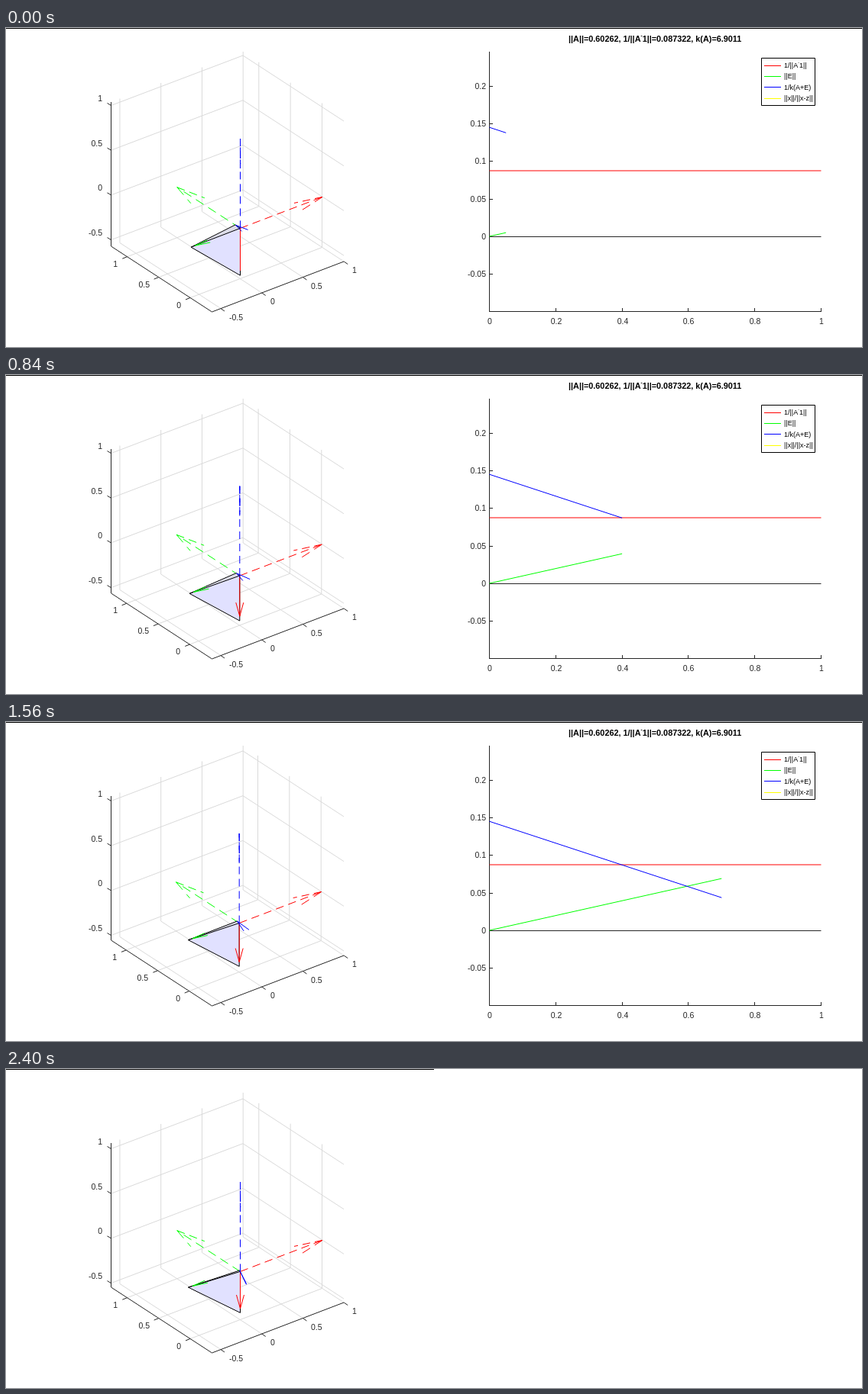
Write an HTML page with a canvas that moves like this. It is 1120x418 px and loops after 2520 ms.

```html
<!DOCTYPE html>
<html lang="en">
<head>
<meta charset="utf-8">
<style>
html, body { margin: 0; width: 100%; height: 100%; overflow: hidden; background: #fff; }
canvas { display: block; }
</style>
</head>
<body>
<canvas id="stage" width="1120" height="418"></canvas>
<script>
const ctx = document.getElementById('stage').getContext('2d');
const STEP = 120, STEPS = 21;
const RED = '#f00', GREEN = '#0f0', BLUE = '#00f', YELLOW = '#ff0';
const INK = '#262626', GRID = '#dadada';
const FAMILY = '"Liberation Sans", Arial, sans-serif';

const add = (a, b, s = 1) => [a[0] + b[0] * s, a[1] + b[1] * s];
const mix = (a, b, p) => [a[0] + (b[0] - a[0]) * p, a[1] + (b[1] - a[1]) * p];

function line(points, color, width = 1, dash = []) {
  ctx.beginPath();
  points.forEach(p => ctx.lineTo(p[0], p[1]));
  ctx.strokeStyle = color;
  ctx.lineWidth = width;
  ctx.setLineDash(dash);
  ctx.stroke();
}

function fill(points, color) {
  ctx.beginPath();
  points.forEach(p => ctx.lineTo(p[0], p[1]));
  ctx.fillStyle = color;
  ctx.fill();
}

// Dashes are spaced evenly along the longer screen axis
function dashed(from, v, color) {
  const unit = Math.hypot(...v) / Math.max(Math.abs(v[0]), Math.abs(v[1]));
  line([from, add(from, v)], color, 1, [10 * unit, 6 * unit]);
}

function text(str, x, y, align = 'left', font = '10.5px', color = INK) {
  ctx.font = font + ' ' + FAMILY;
  ctx.textAlign = align;
  ctx.fillStyle = color;
  ctx.fillText(str, Math.round(x), Math.round(y));
}

// Text with a raised minus sign after the first part
function raised(before, after, x, y, size, weight = '') {
  const font = `${weight} ${size}px ${FAMILY}`;
  const small = `${weight} ${size * 0.6}px ${FAMILY}`;
  ctx.textAlign = 'left';
  ctx.fillStyle = '#000';
  const put = (str, f, dy) => {
    ctx.font = f;
    ctx.fillText(str, x, y + dy);
    x += ctx.measureText(str).width;
  };
  put(before, font, 0);
  put('-', small, -size * 0.55);
  put(after, font, 0);
}

// Screen vectors of one unit along each axis of the box
const X = [107.5, -41], Y = [-82.7, -53.7], Z = [0, -117.4];
const LEFT = [137.5, 286], FRONT = [269.5, 372], RIGHT = [442, 306], BACK = [310, 220];
const RISE = [0, -189];

function drawBox(drift, lift) {
  const alongX = add(RIGHT, FRONT, -1), alongY = add(LEFT, FRONT, -1);

  for (const v of [-0.5, 0, 0.5, 1]) {
    const p = add([334.7, 347], X, v), q = add(p, alongY);
    line([p, q, add(q, RISE)], GRID);
    line([p, add(p, [5, 3.5])], INK);
    text(v, p[0] + 11, p[1] + 15);

    const back = [BACK[0], BACK[1] - lift + Z[1] * v];
    const side = [LEFT[0], back[1] + 65.5];
    line([side, back, [RIGHT[0], back[1] + 86]], GRID);
    line([side, add(side, [-5, -3])], INK);
    text(v, 126, side[1] - 5.5, 'right');
  }
  for (const v of [0, 0.5, 1]) {
    const p = add(add([241, 353.5], drift), Y, v), q = add(p, alongX);
    line([p, q, add(q, RISE)], GRID);
    line([p, add(p, [-6, 2.4])], INK);
    text(v, p[0] - 12, p[1] + 13, 'right');
  }
  line([add(LEFT, RISE), LEFT, FRONT, RIGHT], INK);
}

function unitArrow(o, axis, color, wings) {
  dashed(o, axis, color);
  wings.forEach(w => dashed(add(o, axis), w, color));
}

function drawSpace(k) {
  const p = k / 20;
  const d = k < 15 ? -0.1 * k : 0;
  const drift = [d, d * 0.65];
  const lift = 66.6 - 3 * p;
  drawBox(drift, lift);

  const o = add([306.5, 329 - lift], drift);
  const rv = mix([0, 61.8], [0, 54], p);
  const gv = mix([-64.4, 24.8], [-68, 20.7], p);
  const bv = mix([-6.5, -4.5], [-0.8, -1.5], p);
  const r = add(o, rv), g = add(o, gv), b = add(o, bv);

  unitArrow(o, X, RED, [[-37, 8], [-28, 18]]);
  unitArrow(o, Y, GREEN, [[36, 14], [18, 21]]);
  unitArrow(o, Z, BLUE, [[0, 39], [0.3, 33]]);

  fill([o, b, g], '#dcdce8');
  fill([o, g, r], '#e1e1ff');
  line([o, b, g, r, o, g], '#000');

  const redTip = add(o, rv, 0.9);
  line([o, redTip], RED);
  if (k > 0) line([add(redTip, [-5, -18]), redTip, add(redTip, [5, -18])], RED);

  const greenTip = add(o, gv, 0.92);
  line([add(greenTip, [20, -4.3]), greenTip, add(greenTip, [16, -7.2])], GREEN);

  const blueTip = add(o, bv, 0.9);
  const wing1 = add(o, [10 + 16 * p - 18 * p * p, 2 + 4 * p + 10 * p * p]);
  const wing2 = add(o, [2 + 6 * p, 4 + 4 * p + 9 * p * p]);
  line([wing1, blueTip, wing2], BLUE);
}

const px = t => 632.5 + 434 * t;
const py = v => 273 - 985.5 * v;
const snap = v => Math.round(v) + 0.5;
const ratio = t => (1 - t) * (0.9 + 1.6 * (1 - t));

function drawLegend() {
  ctx.fillStyle = '#fff';
  ctx.fillRect(988, 40, 70, 61);
  line([[988.5, 39.5], [1058.5, 39.5], [1058.5, 101.5], [988.5, 101.5], [988.5, 39.5]], '#000');
  [RED, GREEN, BLUE, YELLOW].forEach((c, i) => {
    const y = Math.floor(49 + 14.4 * i) + 0.5;
    line([[992, y], [1014, y]], c);
  });
  raised('1/||A', '1||', 1018, 52, 9);
  text('||E||', 1018, 66, 'left', '9px', '#000');
  text('1/k(A+E)', 1018, 81, 'left', '9px', '#000');
  text('||x||/||x-z||', 1018, 95, 'left', '9px', '#000');
}

function drawPlot(t) {
  line([[632.5, 31], [632.5, 371.5], [1066.5, 371.5]], INK);
  for (let i = 0; i <= 5; i++) {
    const x = snap(px(i / 5) - 0.5);
    line([[x, 372], [x, 367]], INK);
    text(i / 5, x, 388, 'center');
  }
  for (let i = -1; i <= 4; i++) {
    const y = snap(py(i / 20));
    line([[632, y], [637, y]], INK);
    text(i / 20, 628, y + 3.4, 'right');
  }

  line([[632.5, 273.5], [1066.5, 273.5]], INK);
  line([[632.5, 187], [1066.5, 187]], RED);
  line([[px(0), py(0)], [px(t), py(0.0984 * t)]], GREEN);
  line([[px(0), py(0.1449)], [px(t), py(0.1449 * (1 - t))]], BLUE);

  ctx.save();
  ctx.beginPath();
  ctx.rect(632, 31, 435, 342);
  ctx.clip();
  const curve = [];
  for (let s = 0; s <= t + 0.001; s += 0.05) curve.push([px(s), py(ratio(s))]);
  line(curve, YELLOW);
  ctx.restore();

  drawLegend();
  raised('||A||=0.60262, 1/||A', '1||=0.087322, k(A)=6.9011', 736, 18, 10.85, 'bold');
}

function draw(now) {
  const k = Math.floor(now / STEP) % STEPS;
  const last = k === STEPS - 1;
  ctx.fillStyle = '#fff';
  ctx.fillRect(0, 0, 1120, 418);
  ctx.fillStyle = '#000';
  ctx.fillRect(0, 0, last ? 560 : 1120, 1);
  drawSpace(k);
  if (!last) drawPlot((k + 1) / 20);
}

const start = performance.now();
function loop() {
  draw(performance.now() - start);
  requestAnimationFrame(loop);
}
loop();
</script>
</body>
</html>
```
